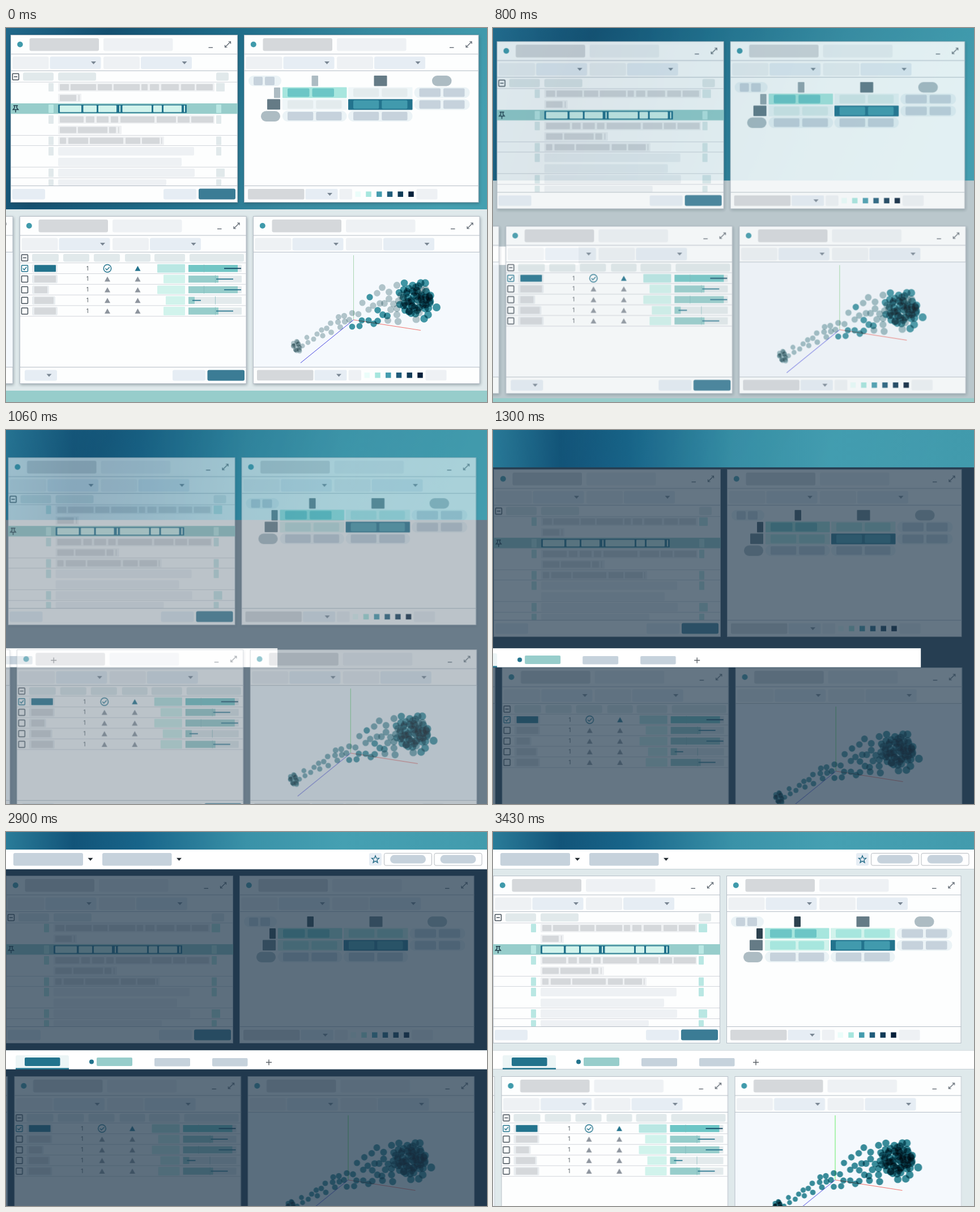
These frames come from a looping animation (849 px wide and 660 px high, 4 s). An HTML page:

```html
<!DOCTYPE html>
<html lang="en">
<head>
<meta charset="utf-8">
<title>Workspace overview</title>
<style>
  html, body { margin: 0; width: 100%; height: 100%; overflow: hidden; background: #fff; }
  svg { display: block; width: 849px; height: 660px; }
  text { font: 10px "Open Sans", sans-serif; fill: #3a434b; text-anchor: middle; }
  .dot { mix-blend-mode: multiply; }
</style>
</head>
<body>
<svg id="stage" viewBox="0 0 849 660">
  <defs>
    <linearGradient id="heroStart" gradientUnits="userSpaceOnUse" x1="0" y1="0" x2="760" y2="340">
      <stop offset="0" stop-color="#20688a"/><stop offset=".2" stop-color="#145070"/>
      <stop offset=".42" stop-color="#1d6a87"/><stop offset=".7" stop-color="#36899f"/>
      <stop offset="1" stop-color="#449fb0"/>
    </linearGradient>
    <linearGradient id="heroEnd">
      <stop offset="0" stop-color="#2a7c99"/><stop offset=".14" stop-color="#125479"/>
      <stop offset=".28" stop-color="#18658a"/><stop offset=".5" stop-color="#3a92a8"/>
      <stop offset=".7" stop-color="#45a0b2"/><stop offset="1" stop-color="#429bad"/>
    </linearGradient>
    <filter id="blur" x="-5%" y="-5%" width="110%" height="110%"><feGaussianBlur stdDeviation="2.5"/></filter>
  </defs>
</svg>
<script>
const LOOP = 4000;
const C = {
  paper: '#fdfefe', line: '#b6bec7', rule: '#d3d6dc', teal: '#3f9aab', deep: '#22738d',
  grey: '#d5d8db', pale: '#eef1f4', select: '#e6edf4', head: '#e1e9eb', mint: '#b9e7e3',
  band: '#97cdcb', button: '#3b7c95', steel: '#c6d2dc', ice: '#ebf3f6', aqua: '#a7e6de',
  foam: '#d1f3ec', lagoon: '#6cc6c6', slate: '#657b86', fog: '#adbcc3', ink: '#2c414e', icon: '#59626c'
};
const stage = document.getElementById('stage');

function add(parent, tag, attrs = {}) {
  const node = document.createElementNS('http://www.w3.org/2000/svg', tag);
  for (const key in attrs) node.setAttribute(key, attrs[key]);
  parent.append(node);
  return node;
}
const group = parent => add(parent, 'g');

function play(node, steps) {
  node.animate(steps.map(([time, style, easing = 'linear']) => ({ ...style, offset: time / LOOP, easing })),
    { duration: LOOP, iterations: Infinity });
}
// Scroll into the dimmed pose, hold, then brighten again.
const phases = (node, prop, start, dim, end = dim) => play(node, [
  [0, { [prop]: start }], [490, { [prop]: start }, 'ease-in-out'],
  [1560, { [prop]: dim }], [2870, { [prop]: dim }, 'ease-out'],
  [3390, { [prop]: end }], [LOOP, { [prop]: end }]
]);
const shift = (node, x, y) => phases(node, 'transform', 'translate(0px,0px)', `translate(${x}px,${y}px)`);

function box(g, x1, y1, x2, y2, fill, r = 2, later) {
  const node = add(g, 'rect', { x: x1, y: y1, width: x2 - x1, height: y2 - y1, rx: r, fill });
  if (later) phases(node, 'fill', fill, later);
  return node;
}
const path = (g, d, stroke, width = 1, fill = 'none') =>
  add(g, 'path', { d, stroke, 'stroke-width': width, fill });
const disc = (g, cx, cy, r, fill) => add(g, 'circle', { cx, cy, r, fill });
const hline = (g, x1, x2, y, color, width = 1) => path(g, `M${x1} ${y}H${x2}`, color, width);
const caret = (g, x, y, fill = '#7a8794') => path(g, `M${x - 4.5} ${y - 2.5}h9l-4.5 5z`, 'none', 0, fill);
const square = (g, x, y, color = '#454f59') =>
  add(g, 'rect', { x: x - 5.5, y: y - 5.5, width: 11, height: 11, rx: 1, fill: 'none', stroke: color, 'stroke-width': 1.5 });
const minusBox = (g, x, y) => { square(g, x, y); hline(g, x - 3, x + 3, y, '#454f59', 1.5); };

function panel(g, x, y, w, plot) {
  const h = 296, r = x + w;
  phases(add(g, 'rect', { x: x + 1, y: y + 2, width: w, height: h, fill: '#33454f', opacity: .4, filter: 'url(#blur)' }),
    'opacity', .4, 0);
  add(g, 'rect', { x: x + .5, y: y + .5, width: w - 1, height: h - 1, fill: C.paper, stroke: C.line });
  if (plot) box(g, x + 1, y + 64, r - 1, y + 266, '#f5f9fd', 0);
  disc(g, x + 16.8, y + 17, 5, C.teal);
  box(g, x + 33.5, y + 6, x + 156, y + 28.5, C.grey, 3);
  box(g, x + 164, y + 6, x + 286.5, y + 28.5, C.pale, 3);
  hline(g, r - 51.5, r - 44, y + 22.5, C.icon, 1.3);
  const ex = r - 17.5, ey = y + 17;
  path(g, `M${ex - 5} ${ey + 5}l10-10M${ex + 1} ${ey - 5}h4v4M${ex - 5} ${ey + 1}v4h4`, C.icon, 1.2);
  for (const dx of [0, 160.5]) {
    box(g, x + 3.5 + dx, y + 38.5, x + 67.5 + dx, y + 60.5, C.pale, 3);
    box(g, x + 69.5 + dx, y + 38.5, x + 159.5 + dx, y + 60.5, C.select, 3);
    caret(g, x + 146.5 + dx, y + 49.5);
  }
  for (const dy of [34, 63.5, 266.5]) hline(g, x, r, y + dy, C.line);
}

function legend(g, x, y) {
  box(g, x + 7, y, x + 106.5, y + 18.5, C.grey);
  box(g, x + 108.5, y, x + 165.5, y + 18.5, C.select);
  caret(g, x + 151.5, y + 9.5);
  box(g, x + 168.5, y, x + 191, y + 18.5, C.pale);
  ['#ebfdfa', '#a6e6de', '#459cae', '#205c7a', '#113b57', '#06203a'].forEach((color, i) => {
    const left = x + 196.5 + i * 18.75;
    box(g, left, y + 4.5, left + 9.5, y + 14, color, 0);
  });
  box(g, x + 304.5, y, x + 341.5, y + 18.5, C.pale);
}

function words(g, y, right, spans, bar) {
  box(g, 92, y, right, y + 15, '#eff1f3', 1);
  for (const [a, b] of spans) box(g, a, y + 2, b, y + 13, C.grey, 1);
  if (bar) box(g, bar, y + 2, bar + 1.5, y + 13, C.grey, 0);
}

function textTable(g) {
  panel(g, 8, 12, 401);
  minusBox(g, 17, 86);
  for (const [a, b] of [[30, 84], [92, 159], [371, 393]]) box(g, a, 78.5, b, 93, C.head, 3);
  for (const y of [95.5, 189.5, 207.5, 245.5, 264.5]) hline(g, 9, 408, y, C.rule);
  box(g, 8, 133, 409, 151.5, C.band, 0);
  [97, 154, 191.5, 210, 248, 267].forEach((y, i) => {
    const bottom = Math.min(y + 15, 278);
    box(g, 75, y, 84, bottom, C.head, 1, C.mint);
    box(g, 371, y, i === 0 || i === 4 ? 386 : 380, bottom, C.head, 1, C.mint);
  });
  box(g, 75, 135, 84, 150, C.mint, 1);
  box(g, 371, 135, 380, 150, C.mint, 1);
  words(g, 97, 368, [[95, 111], [114, 159], [162, 187], [190, 236], [239, 250], [254, 270], [274, 305], [309, 333], [336, 365]]);
  words(g, 116, 133, [[95, 124]], 128);
  words(g, 154, 368, [[95, 137], [141, 156], [160, 181], [185, 198], [202, 262], [266, 300], [303, 324], [327, 366]]);
  words(g, 172.5, 204, [[95, 124], [127, 179], [182, 194]], 198);
  words(g, 191.5, 279, [[95, 106], [110, 145], [148, 207], [211, 237], [240, 271]], 274);
  for (const [y, right] of [[210, 332], [229, 310], [248, 333]]) box(g, 92, y, right, y + 15, C.pale, 2);
  box(g, 92, 267, 283, 278, C.pale, 2);
  box(g, 92, 135, 319, 150, C.deep, 1);
  for (const [a, b] of [[95, 133], [136.5, 160], [163, 195], [200, 202], [205.5, 257], [260, 275], [278, 310], [314, 316]])
    box(g, a, 136.5, b, 148.5, C.foam, 1);
  path(g, 'M13 137h8M15 137v4l-2.5 3h9l-2.5-3v-4M17 144v5', '#1f3d4a', 1.5);
  box(g, 11, 284, 69, 302.5, C.select, 3);
  box(g, 278, 284, 336, 302.5, C.select, 3);
  box(g, 340, 283.5, 405, 302.5, C.button, 3);
}

function matrix(g) {
  panel(g, 420, 12, 414.5);
  box(g, 428, 84, 486, 102.5, C.ice, 9);
  box(g, 437, 86, 453, 101, C.steel);
  box(g, 457, 86, 474, 101, C.steel);
  box(g, 539.5, 84, 551, 102.5, C.fog, 1, C.ink);
  box(g, 649.5, 84, 672.5, 102.5, C.slate, 1);
  box(g, 752, 84, 786.5, 102.5, C.fog, 9);
  box(g, 473, 105, 484, 123.5, C.fog, 1, C.ink);
  box(g, 461, 125.5, 484, 144, C.slate, 1);
  box(g, 450, 146.5, 484, 165, C.fog, 9);
  const pair = (x, y, w, back, front, r, backB, frontB, inner = (w - 23) / 2) => {
    box(g, x, y, x + w, y + 19, back, r, backB);
    for (const left of [x + 9, x + 14 + inner])
      box(g, left, y + 2, left + inner, y + 17, front, 2, frontB);
  };
  pair(488, 104.5, 113.5, C.aqua, C.lagoon, 1, null, null, 38.5);
  pair(604, 104.5, 113.5, '#eff6f8', '#e3ebed', 1, C.foam, C.aqua);
  pair(488, 125.5, 113.5, '#eff6f8', '#e3ebed', 1, C.foam, C.aqua);
  pair(604, 125.5, 113.5, C.deep, '#419aad', 1);
  for (const [x, y, w] of [[488, 146, 113.5], [604, 146, 113.5], [720.5, 104.5, 98], [720.5, 125.5, 98]])
    pair(x, y, w, C.ice, C.steel, 9);
  legend(g, 420, 284);
}

function scoreTable(g) {
  panel(g, 24, 332, 400.5);
  minusBox(g, 33, 405.5);
  for (const [a, b] of [[46, 93], [101, 147], [155, 201], [210, 255], [262, 316], [324, 420]])
    box(g, a, 398.5, b, 412.5, C.head, 3);
  hline(g, 25, 424, 414.5, C.rule);
  // label end, tag start, bar end, whisker start and end, tick
  [[88, 267, 409, 385, 415, 349], [88, 278, 375, 371, 401, 369], [73, 267, 409, 385, 415, 349],
   [84, 282, 333, 329, 344, 369], [88, 278, 375, 371, 401, 369]].forEach(([label, tag, bar, from, to, tick], i) => {
    const y = 424.3 + i * 18.8, first = i === 0;
    const triangle = (x, color) => path(g, `M${x - 5} ${y + 4.5}l5-9 5 9z`, 'none', 0, color);
    hline(g, 25, 424, y + 9.2, C.rule);
    square(g, 33, y, first ? C.deep : undefined);
    box(g, 46, y - 7.5, label + 3, y + 7.5, '#e9edf0');
    box(g, 50, y - 6, label, y + 6, first ? C.deep : C.grey, 1);
    add(g, 'text', { x: 144, y: y + 3.2 }).textContent = '1';
    if (first) {
      path(g, `M30 ${y}l2.2 2.5 4-5`, C.deep, 1.4);
      add(g, 'circle', { cx: 179, cy: y, r: 6.7, fill: 'none', stroke: C.deep, 'stroke-width': 1.5 });
      path(g, `M175.5 ${y}l2.5 2.7 4.7-5`, C.deep, 1.5);
    } else triangle(179, '#8e959e');
    triangle(232.5, first ? C.deep : '#8e959e');
    box(g, tag, y - 7.5, 316, y + 7.5, first ? C.mint : C.foam, 1);
    box(g, 322, y - 6.2, 416, y + 6.2, '#e3eaec', 1);
    box(g, 322, y - 6.2, bar, y + 6.2, first ? '#72c6c5' : C.band, 0, first ? C.lagoon : null);
    path(g, `M${tick + .5} ${y - 7}v14`, '#7fb8ba', .7);
    hline(g, from, to, y, first ? '#0f4560' : '#2b7890', 1.8);
  });
  box(g, 33, 603.5, 90, 622.5, C.select, 3);
  caret(g, 76, 613);
  box(g, 294, 603.5, 352, 622.5, C.select, 3);
  box(g, 355.5, 603.5, 421, 622.5, C.button, 3);
}

function scatter(g) {
  panel(g, 436, 332, 400.5, true);
  phases(path(g, 'M613.5 401V515', '#a9d6b0'), 'stroke', '#a9d6b0', '#63ee63');
  path(g, 'M613.5 515L732 533.5', '#f2706a');
  path(g, 'M613.5 515L520 591', '#4747e0');
  const dots = group(g);
  let seed = 11;
  const random = () => (seed = seed * 16807 % 2147483647) / 2147483647;
  const dot = (x, y, teal) => {
    const fill = teal ? '#4199a5' : '#b7c9cc';
    const node = disc(dots, x, y, 4.1 + (x - 505) * .0112, fill);
    node.setAttribute('class', 'dot');
    phases(node, 'fill', fill, '#3a8e9a');
  };
  const grey = '531,546 533,555 543,549 549,540 559,543 557,533 566,530 574,537 573,521 586,519 587,510 590,528 597,508 598,518 611,503 606,515 622,505 629,485 640,497 655,468 664,458 676,466 676,478 660,486 648,490 679,497 690,495 684,487 668,486 674,516 692,518 690,506 690,454 724,514';
  const teal = '611,527 624,526 628,516 640,516 649,522 656,517 642,475 656,498 665,506 673,508 703,450 732,450 740,450 749,472 760,493 745,506 738,513 695,488 694,467';
  for (let i = 0; i < 16; i++) dot(507 + random() * 19, 552 + random() * 22, false);
  for (const p of grey.split(' ')) dot(...p.split(',').map(Number), false);
  for (const p of teal.split(' ')) dot(...p.split(',').map(Number), true);
  for (let i = 0; i < 56; i++) {
    const angle = i * 2.4, reach = Math.sqrt((i + .5) / 56);
    const x = 722 + Math.cos(angle) * reach * 29 + random() * 6 - 3;
    dot(x, 480 + Math.sin(angle) * reach * 26 + random() * 6 - 3, x > 698 && i % 7 !== 3);
  }
  legend(g, 436, 603.5);
}

function tabs(g) {
  box(g, 0, 385, 859, 419, '#fff', 0);
  hline(g, 0, 859, 385.5, '#d5dde0');
  hline(g, 0, 859, 418.5, '#c6d0d5');
  box(g, 17, 394, 111, 418, '#ecf5f6', 3);
  box(g, 17, 416.5, 111, 419, C.deep, 0);
  box(g, 33, 398, 95.5, 413, C.deep);
  disc(g, 151, 405.5, 4, C.deep);
  box(g, 160, 398, 223, 413, C.band);
  box(g, 262, 399, 325, 413.5, C.steel);
  box(g, 364, 399, 426.5, 413.5, C.steel);
  path(g, 'M459 406.5h10M464 401.5v10', '#5a6066', 1.4);
}

function toolbar(g) {
  box(g, 0, 31, 849, 65, '#fff', 0);
  hline(g, 0, 849, 65.5, '#c6d0d5');
  box(g, 13, 37, 136, 59.5, C.steel, 3);
  box(g, 170, 37, 292.5, 59.5, C.steel, 3);
  caret(g, 149, 48.2, '#222a30');
  caret(g, 305.5, 48.2, '#222a30');
  box(g, 641, 37, 663, 59.5, C.select, 3);
  const star = Array.from({ length: 10 }, (_, i) => {
    const r = i % 2 ? 2.9 : 6.8, a = i * Math.PI / 5;
    return `${652 + r * Math.sin(a)} ${48.5 - r * Math.cos(a)}`;
  });
  path(g, `M${star.join('L')}z`, '#1c6683', 1.3);
  for (const x of [667.5, 756]) {
    add(g, 'rect', { x, y: 37.5, width: 84, height: 21.5, rx: 3, fill: '#fff', stroke: '#b5babf' });
    box(g, x + 10.5, 40.5, x + 73.5, 55.5, C.steel, 7.5);
  }
}

box(stage, 0, 0, 849, 320, 'url(#heroEnd)', 0);
phases(box(stage, 0, 0, 849, 320, 'url(#heroStart)', 0), 'opacity', 1, 0);

const backdrop = box(stage, 0, 320, 849, 1000, '#dfe9eb', 0);
phases(backdrop, 'fill', '#dfe9eb', '#0d263d', '#dfe9eb');
shift(backdrop, 0, -289);
shift(box(stage, 0, 640, 849, 760, C.band, 0), 0, 76);

const tabBar = group(stage);
tabs(tabBar);
phases(tabBar, 'transform', 'translate(-859px,0px)', 'translate(0px,0px)');

const upper = group(stage), lower = group(stage);
textTable(upper);
matrix(upper);
panel(lower, -388, 332, 400.5, true);
scoreTable(lower);
scatter(lower);
for (const [row, x, y] of [[upper, -8, 65], [lower, -9.5, 99]]) {
  shift(row, x, y);
  phases(row, 'opacity', 1, .2, 1);
}

const topBar = group(stage);
toolbar(topBar);
play(topBar, [[0, { opacity: 0 }], [1540, { opacity: 0 }], [1640, { opacity: 1 }], [LOOP, { opacity: 1 }]]);
</script>
</body>
</html>
```
